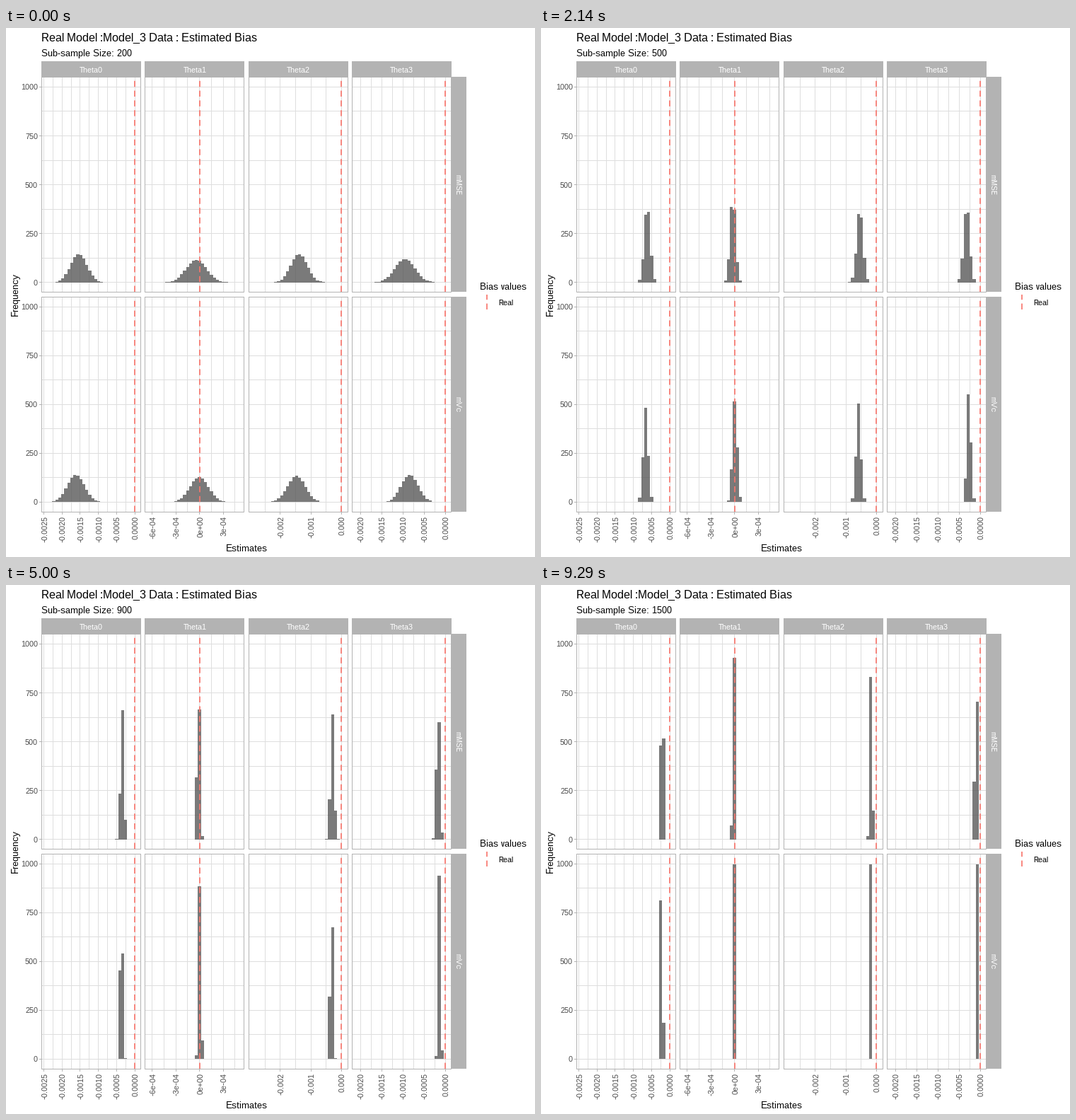
A matplotlib script for the animation above (10000 ms loop, 748 by 748 pixels).

```python
import math
import matplotlib.pyplot as plt
from matplotlib.animation import FuncAnimation
from matplotlib.collections import LineCollection, PolyCollection
from matplotlib.patches import Rectangle

SIDE, DPI = 748, 64
PT = 72 / DPI                 # points per pixel
LOOP, STEPS = 10000, 200
GREY, GRID, RED, LABEL = "#B3B3B3", "#DEDEDE", "#F8766D", "#4D4D4D"
TOPS, BOTTOMS, BASES = (69, 380), (373, 684), (359.8, 670.4)
PER_COUNT = 0.2764            # pixels per observation
BIN, BINS, RUNS = 4.24, 30, 1000
SIZES = range(200, 1501, 100)

plt.rcParams.update({"font.family": "Liberation Sans",
                     "text.hinting": "native", "text.hinting_factor": 1})
fig = plt.figure(figsize=(SIDE / DPI, SIDE / DPI), dpi=DPI, facecolor="white")
ax = fig.add_axes([0, 0, 1, 1])
ax.set_xlim(0, SIDE)
ax.set_ylim(SIDE, 0)
ax.axis("off")


def text(x, y, s, px, color="black", ha="left", va="baseline", rot=0):
    return ax.text(x, y, s, fontsize=px * PT, color=color, ha=ha, va=va,
                   rotation=rot)


def box(x0, y0, x1, y1, color):
    ax.add_patch(Rectangle((x0, y0), x1 - x0, y1 - y0, color=color, lw=0,
                           zorder=2))


def rect(x0, y0, x1, y1):
    return [(x0, y0), (x1, y0), (x1, y1), (x0, y1)]


def thin(paths, color, z):
    """One-pixel lines through pixel centres."""
    paths = [[(math.floor(x) + 0.5, math.floor(y) + 0.5) for x, y in p]
             for p in paths]
    ax.add_collection(LineCollection(paths, colors=color, linewidths=PT,
                                     zorder=z, snap=False, capstyle="projecting"))


def dashed(x, low, top):
    px = 1.7
    ax.plot((x, x), (low, top), color=RED, lw=px * PT, zorder=4,
            linestyle=(0, (8.4 / px, 5.4 / px)))


class Column:
    """Horizontal scale of one parameter: zero position and tick spacing."""

    def __init__(self, i, zero, step, value, form, first, last=0, lowest=None):
        self.name = f"Theta{i}"
        self.x0 = 50.5 + 146.4 * i
        self.x1 = self.x0 + 139.8
        self.zero = zero
        ks = range(first, last + 1)
        self.ticks = [(zero + k * step, format(k * value, form)) for k in ks]
        halves = range(first if lowest is None else lowest, last + (i == 1))
        self.grid = [x for x, _ in self.ticks]
        self.grid += [zero + (k + 0.5) * step for k in halves]
        self.first_bin = -16 if i == 1 else 1 - BINS


COLUMNS = [
    Column(0, 182, 25.7, 0.0005, ".4f", -5),
    Column(1, 273.6, 33.4, 0.0003, ".0e", -2, 1),
    Column(2, 474.5, 43.4, 0.001, ".3f", -2, lowest=-3),
    Column(3, 621, 29.9, 0.0005, ".4f", -4),
]


def draw_panel(col, row):
    x0, x1, top, low = col.x0, col.x1, TOPS[row], BOTTOMS[row]
    ys = [BASES[row] - count * PER_COUNT for count in range(0, 1001, 125)]
    thin([[(x, low), (x, top)] for x in col.grid]
         + [[(x0, y), (x1, y)] for y in ys], GRID, 1)
    dashed(col.zero, low, top)
    border = rect(x0, top, x1, low)
    thin([border + border[:1]], GREY, 5)


def draw_chart():
    text(50, 19, "Real Model :Model_3 Data : Estimated Bias", 15.5)
    for col in COLUMNS:
        box(math.floor(col.x0), 47, math.floor(col.x1) + 1, 69, GREY)
        text((col.x0 + col.x1) / 2, 63, col.name, 11, "white", "center")
        thin([[(x, 685), (x, 687)] for x, _ in col.ticks], GREY, 2)
        for x, label in col.ticks:
            text(x + 1.5, 690, label, 11, LABEL, "center", "top", 90)
        for row in range(2):
            draw_panel(col, row)
    for name, top, low, base in zip(("mMSE", "mVc"), TOPS, BOTTOMS, BASES):
        box(630, top, 651, low, GREY)
        text(638.5, (top + low) / 2, name, 11, "white", "center", "center", 270)
        for count in range(0, 1001, 250):
            y = base - count * PER_COUNT
            thin([[(47, y), (49, y)]], GREY, 2)
            text(45, y + 4, str(count), 11, LABEL, "right")
    text(340, 740, "Estimates", 13, ha="center")
    text(13.3, 376.5, "Frequency", 13, ha="center", va="center", rot=90)
    text(670, 370, "Bias values", 13)
    dashed(680.5, 397.5, 377)
    text(696, 391.5, "Real", 11)


class Histogram:
    """Normal estimates whose bias and spread, in bins, shrink like 1 / n.

    Each is (limit, extra): limit / n plus an extra fading like 1 / n**2.
    """

    def __init__(self, i, row, bias, spread):
        self.col, self.base = COLUMNS[i], BASES[row]
        self.bias, self.spread = bias, spread

    def rects(self, n):
        mean, sd = ((limit + extra * SIZES[0] / n) / n
                    for limit, extra in (self.bias, self.spread))

        def below(k):
            return 0.5 * (1 + math.erf((k - 0.5 - mean) / (sd * math.sqrt(2))))

        def edge(k):
            return round(self.col.zero + (k - 0.5) * BIN)

        first = self.col.first_bin
        for k in range(first, first + BINS):
            count = round(RUNS * (below(k + 1) - below(k)))
            if count:
                top = round(self.base - count * PER_COUNT)
                yield rect(edge(k), top, edge(k + 1), round(self.base))


HISTOGRAMS = [
    Histogram(0, 0, (-3730, 0), (425, 120)),
    Histogram(1, 0, (-305, 100), (255, 430)),
    Histogram(2, 0, (-2735, -105), (470, 75)),
    Histogram(3, 0, (-1940, -740), (350, 310)),
    Histogram(0, 1, (-4035, 105), (265, 300)),
    Histogram(1, 1, (130, -140), (165, 460)),
    Histogram(2, 1, (-3010, 0), (215, 375)),
    Histogram(3, 1, (-1570, -800), (140, 425)),
]

draw_chart()
subtitle = text(50, 39.5, "", 13)
bars = PolyCollection([], facecolors="#595959", alpha=0.8, linewidths=0,
                      antialiaseds=False, zorder=3)
ax.add_collection(bars)


def draw(step):
    # hard switch between equal holds, rounded down to the step
    n = SIZES[(len(SIZES) * (step + 1) - 1) // STEPS]
    subtitle.set_text(f"Sub-sample Size: {n}")
    bars.set_verts([r for hist in HISTOGRAMS for r in hist.rects(n)])
    return []


anim = FuncAnimation(fig, draw, frames=STEPS, init_func=lambda: draw(0),
                     interval=LOOP / STEPS, repeat=True, repeat_delay=0,
                     blit=False)
plt.show()
```
